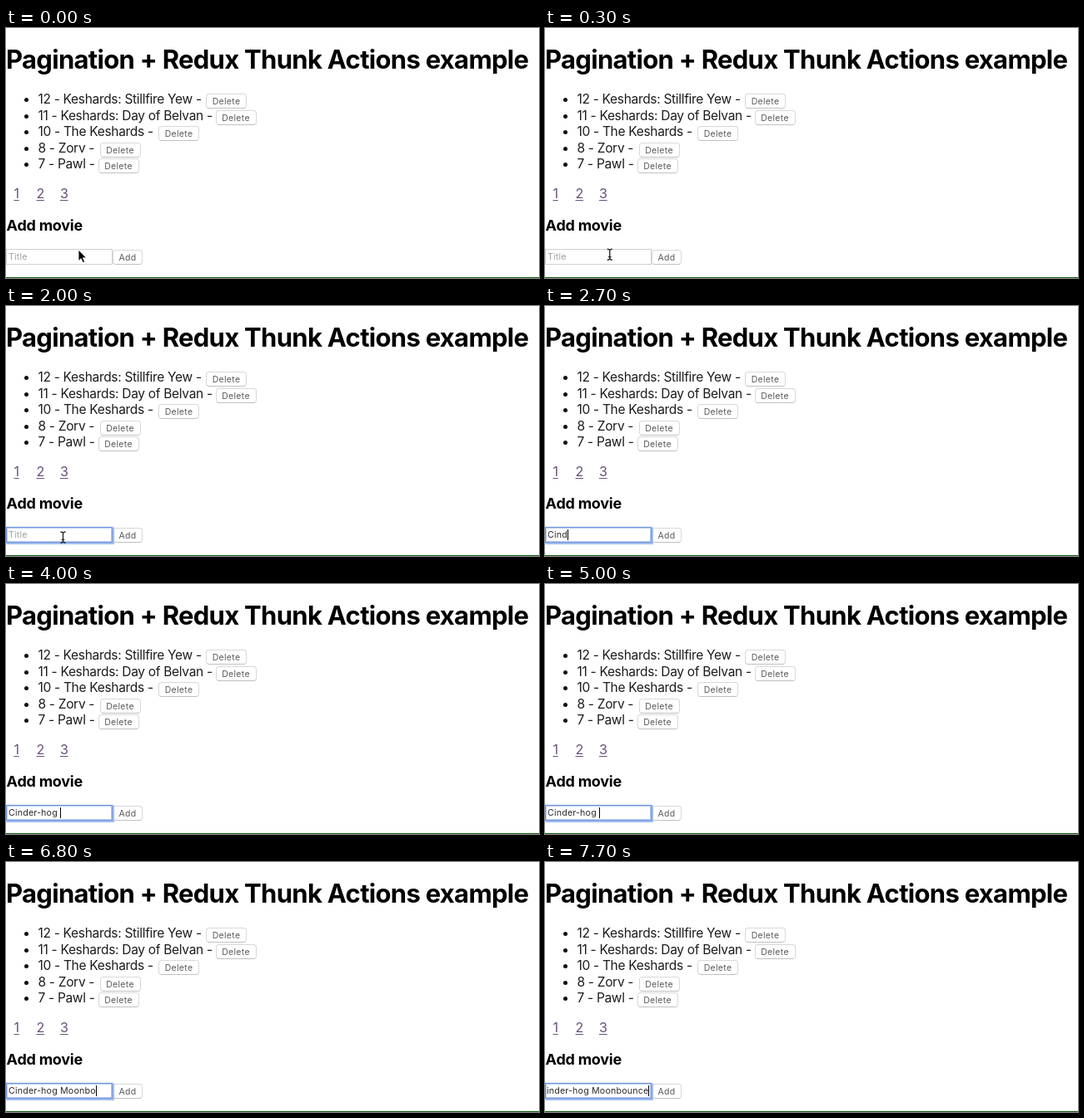
Animation of 640 by 301 pixels, one loop 8000 ms. Source, as an HTML page:

```html
<!DOCTYPE html>
<html lang="en">
<head>
<meta charset="utf-8">
<title>Pagination example</title>
<style>
  html, body { margin: 0; width: 100%; height: 100%; overflow: hidden; background: #fff; }
  body { position: relative; font: 15.5px Inter, sans-serif; letter-spacing: -.02em; color: #1c1c1c; font-optical-sizing: none; }
  body > * { position: absolute; margin: 0; box-sizing: border-box; white-space: pre; }
  h1 { left: 0; top: 18px; font-size: 31px; line-height: 40px; letter-spacing: -.0225em; color: #000; }
  h3 { left: .6px; top: 227px; font-size: 18px; line-height: 21px; letter-spacing: -.013em; color: #000; }
  .row { line-height: 20px; }
  .row::before { content: ""; position: absolute; left: -17px; top: 8px; width: 5px; height: 5px; border-radius: 50%; background: #111; }
  .button { height: 18px; border: 1px solid #d8d8d8; border-bottom-color: #c0c0c0; border-radius: 4px; background: #fff; color: #5a5a5a; font-size: 10.5px; line-height: 17px; letter-spacing: .03em; text-align: center; }
  .page { top: 188.5px; font-size: 16px; line-height: 20px; color: #67507a; text-decoration: underline 1px; text-underline-offset: 2px; }
  #field { left: 0; top: 266px; width: 128px; height: 19px; border: 1px solid #cfcfcf; background: #fff; }
  #field.focus { border-color: #7196de; box-shadow: 0 0 1px 1.5px #a3bdec, inset 0 0 0 1px #b9cdf3; }
  #view { left: 2px; top: 267px; width: 124px; height: 17px; overflow: hidden; font-size: 10.7px; line-height: 18px; letter-spacing: .015em; }
  #line { display: inline-block; padding: 0 1px; }
  #caret { display: inline-block; width: 1px; height: 13px; background: #000; vertical-align: -3px; }
  #stage { inset: 0; width: 100%; height: 100%; overflow: hidden; }
  .bottom { left: 0; top: 300px; width: 100%; height: 1px; background: #0c5c0c; }
</style>
</head>
<body>
<h1>Pagination + Redux Thunk Actions example</h1>
<h3>Add movie</h3>
<div id="field"></div>
<div id="view"><span id="line"><span id="text"></span><span id="caret"></span></span></div>
<div class="bottom"></div>
<svg id="stage">
  <path id="arrow" d="M0 0V13.5L3.1 10.7L5.3 15.6L7.6 14.6L5.5 9.8H9.5Z" fill="#000" stroke="#fff" stroke-width=".9"/>
  <g id="beam" fill="none" stroke="#222" stroke-width="1.3">
    <path d="M-3-6.5Q0-6.5 0-4.5V4.5Q0 6.5-3 6.5M3-6.5Q0-6.5 0-4.5M0 4.5Q0 6.5 3 6.5M-1.8 2.8H1.8"/>
    <circle id="ring" r="15" stroke="#111" stroke-width="3"/>
  </g>
</svg>
<script>
const $ = id => document.getElementById(id);
const add = (className, text, left, top, width) => {
  const el = document.createElement('div');
  el.className = className;
  el.textContent = text;
  el.style.left = left + 'px';
  if (top !== undefined) el.style.top = top + 'px';
  if (width) el.style.width = width + 'px';
  document.body.insertBefore(el, $('field'));
};

[
  ['12 - Keshards: Stillfire Yew -', 240],
  ['11 - Keshards: Day of Belvan -', 251.5],
  ['10 - The Keshards -', 183],
  ['8 - Zorv -', 112.5],
  ['7 - Pawl -', 110.5]
].forEach(([text, left], i) => {
  const offset = 19.5 * i;
  add('row', text, 38.5, 76 + offset);
  add('button', 'Delete', left, Math.round(79 + offset), 49);
});
[9.5, 36.5, 65].forEach((left, i) => add('page', i + 1, left));
add('button', 'Add', 128, 267, 36);

// One time per key; '<' is backspace.
const keys = 'Cinder-hog Mon<onbounce';
const times = [2200, 2300, 2500, 2700, 2900, 3000, 3200, 3400, 3500, 3700, 4000,
  5500, 5600, 5700, 6000, 6200, 6400, 6600, 6800, 7000, 7200, 7400, 7600];
const FOCUS = 1100, LOOP = 8000;
const show = (id, on) => { $(id).style.display = on ? '' : 'none'; };

function draw(now) {
  const t = Math.floor(now % LOOP / 100) * 100;
  const focused = t >= FOCUS;
  const count = times.filter(time => time <= t).length;
  let typed = '';
  for (const key of keys.slice(0, count)) typed = key === '<' ? typed.slice(0, -1) : typed + key;

  $('field').className = focused ? 'focus' : '';
  $('text').textContent = typed || 'Title';
  $('text').style.color = typed ? '#2c2c2c' : '#a0a0a0';
  const lastKey = count ? times[count - 1] : FOCUS;
  const caret = $('caret').style;
  caret.visibility = focused && (t - lastKey) % 1000 < 500 ? 'visible' : 'hidden';
  caret.position = typed ? '' : 'absolute';
  caret.left = typed ? '' : '1px';
  caret.top = typed ? '' : '2px';
  $('view').scrollLeft = typed ? 1000 : 0;

  const p = Math.min(1, t / 600);
  const ease = p * p * (3 - 2 * p);
  const place = `translate(${87 - 18.5 * ease} ${267 + 11.5 * ease})`;
  $('arrow').setAttribute('transform', place);
  $('beam').setAttribute('transform', place);
  show('arrow', t < 200);
  show('beam', t >= 200 && t < 2200);
  show('ring', t >= 1000 && t < 1200);
}

const start = performance.now();
(function tick() {
  draw(performance.now() - start);
  requestAnimationFrame(tick);
})();
</script>
</body>
</html>
```
